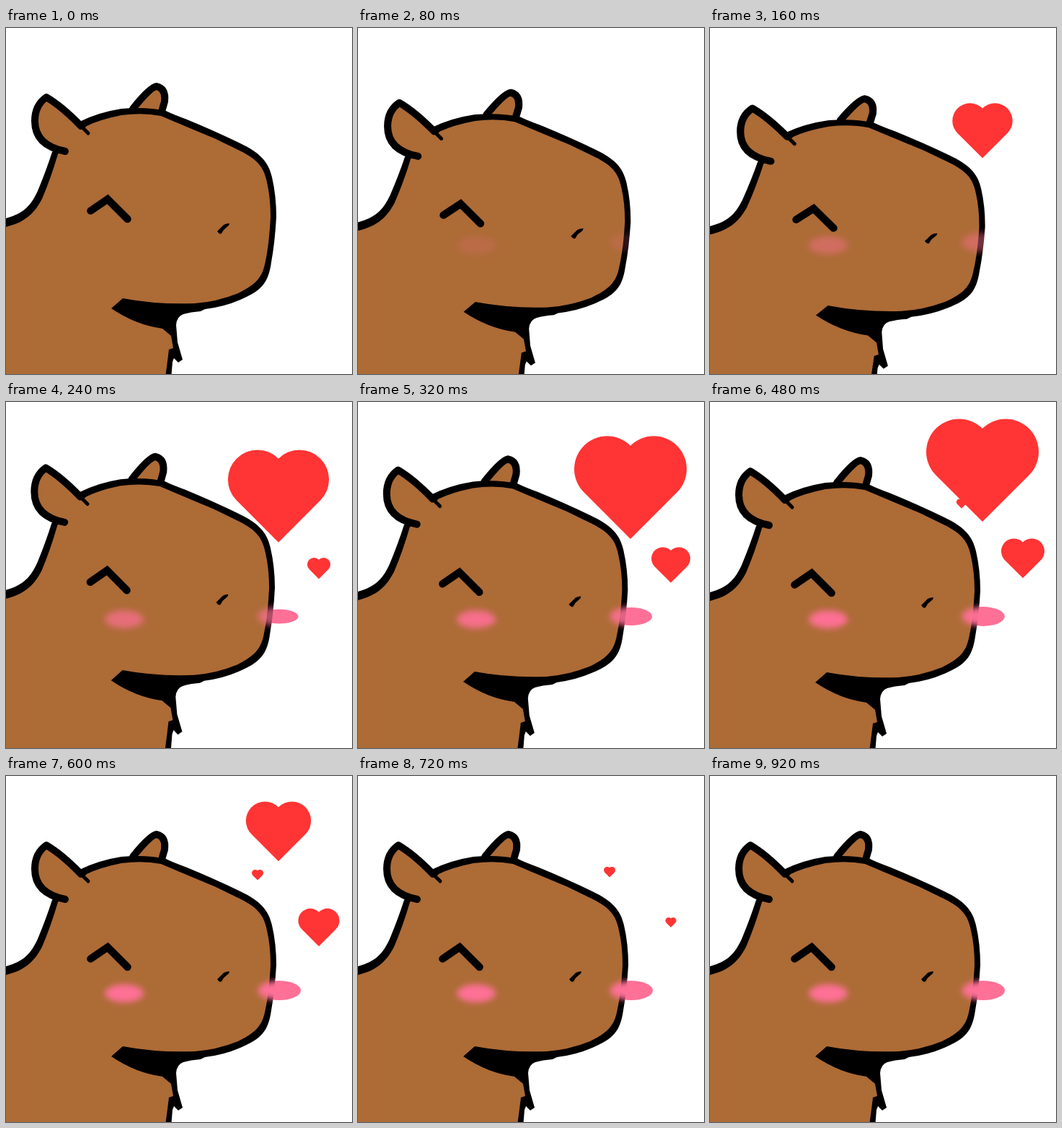
Animation of 480x480 px, one loop 0.96 s. Source, as an HTML page with a canvas:

```html
<!DOCTYPE html>
<html lang="en">
<head>
<meta charset="utf-8">
<title>Happy capybara</title>
<style>
  html, body { margin: 0; width: 100%; height: 100%; overflow: hidden; background: #fff; }
  canvas { display: block; width: 480px; height: 480px; }
</style>
</head>
<body>
<canvas id="stage" width="480" height="480"></canvas>
<script>
const ctx = document.getElementById('stage').getContext('2d');
const LOOP = 960, STEP = 40;
const BROWN = '#ad6b36', INK = '#000', PINK = '#ff7096', RED = '#ff3434';

const silhouette = new Path2D(`M-10 267 L0 264 C27 257 36 243 44 226 Q56 197 64 172
  L102 130 Q128 117 160 112 Q195 109 222 115 Q232 120 250 126.5 Q290 143 325 160
  C352 173 364 185 369 207 Q375 233 375 262 Q373 298 368 325 C364 355 353 365 325 377
  Q302 387 276 390 L270 393 Q256 394 246 397 Q237 400 236 412 L238 436 L245 460
  L239 464 L233 458 L231 463 L228 500 L-10 500 Z`);
const fur = new Path2D(`M-10 279 L0 276 C28 269 40 256 50 237 Q62 209 72 175
  L112 136 Q130 127 160 121 Q190 117 215 122 Q255 139 290 153.5 L325 170.5
  C350 183 358 194 362 214 Q367 236 367 262 Q365 300 360 323 C356 347 346 356 322 368
  Q292 380 262 382 Q210 384 162 375 L146 389 Q180 412 217 417 L229 427 L232 444
  L226 446 L224 462 L219 500 L-10 500 Z`);
const farEar = new Path2D('M176 112 Q200 82 209 81 Q222 84 220 102 L216 116');
const nearEar = new Path2D('M104 136 Q78 109 56 96 C43 105 40 118 40 129 C40 153 56 166 82 171');
const earFill = new Path2D('M114 146 Q78 109 56 96 C43 105 40 118 40 129 C40 153 56 166 82 171 Z');
const earTip = new Path2D('M100 132 L114 146');
const eye = new Path2D('M117.5 253.5 L141 237.5 L168.5 265');
const nostril = new Path2D('M293 282 L302 273 Q306 271 310 271 L309 274 L302 280 L299 285 Q296 287 293 282 Z');

// [time, value] steps
const squash = [[0, 0], [40, .15], [80, .5], [120, .9], [160, 1], [200, .3],
  [240, -.3], [280, -.22], [320, -.1], [400, 0]];
const blush = [[0, 0], [40, .04], [160, .44], [240, .7], [320, .89], [400, .97], [560, 1]];

// x, start y, rise per ms, full width, delay
const hearts = [
  [378, 166.3, .149, 156, 0],
  [434, 244.5, .0575, 60, 80],
  [349, 157, .033, 16, 240]
];

function valueAt(steps, t) {
  const i = steps.findIndex(s => s[0] > t);
  if (i < 0) return steps[steps.length - 1][1];
  const [t0, a] = steps[i - 1], [t1, b] = steps[i];
  return a + (b - a) * (t - t0) / (t1 - t0);
}

const clamp = x => Math.min(1, Math.max(0, x));
const easeIn = x => clamp(x) ** 2;
const easeOut = x => 1 - easeIn(1 - x);
const heartScale = t => easeOut((t - 90) / 220) - easeIn((t - 480) / 185);

function fill(path, color) {
  ctx.fillStyle = color;
  ctx.fill(path);
}

function stroke(path, width) {
  ctx.lineWidth = width;
  ctx.stroke(path);
}

function drawCapybara(k) {
  ctx.setTransform(1 + .018 * k, .01 * k, -.012 * k, 1 - .023 * k, 3 * k, 17 * k);
  ctx.strokeStyle = INK;
  ctx.lineCap = 'round';
  ctx.lineJoin = 'round';
  fill(farEar, BROWN);
  stroke(farEar, 10);
  fill(silhouette, INK);
  fill(fur, BROWN);
  fill(earFill, BROWN);
  stroke(nearEar, 10);
  stroke(earTip, 5);
  ctx.lineJoin = 'miter';
  stroke(eye, 10.5);
  fill(nostril, INK);
  ctx.resetTransform();
}

function ellipse(x, y, rx, ry) {
  ctx.beginPath();
  ctx.ellipse(x, y, rx, ry, 0, 0, 7);
  ctx.fill();
}

// Soft on the fur, hard-edged where the cheek pokes past the outline
function drawBlush(alpha) {
  ctx.save();
  ctx.fillStyle = PINK;
  ctx.globalCompositeOperation = 'source-atop';
  ctx.globalAlpha = alpha;
  ctx.filter = 'blur(4.5px)';
  ellipse(164, 301.5, 27, 12.5);
  ellipse(379, 297.5, 29.5, 13.5);
  ctx.restore();
  if (alpha <= .5) return;
  ctx.save();
  const inset = 8 * (1 / alpha - 1);
  ctx.fillStyle = PINK;
  ctx.globalCompositeOperation = 'destination-over';
  ellipse(379, 297.5, 30 - inset, 13.5 - inset);
  ctx.restore();
}

function drawHeart(x, y, width) {
  const r = width / (2 + Math.SQRT2), d = r * Math.SQRT1_2, q = Math.PI / 4;
  const cy = y + (r - d) / 2;
  ctx.beginPath();
  ctx.arc(x - d, cy - d, r, 3 * q, -q);
  ctx.arc(x + d, cy - d, r, -3 * q, q);
  ctx.lineTo(x, cy + 2 * d);
  ctx.fillStyle = RED;
  ctx.fill();
}

function draw(t) {
  ctx.clearRect(0, 0, 480, 480);
  drawCapybara(valueAt(squash, t));
  drawBlush(valueAt(blush, t));
  for (const [x, y, rise, width, delay] of hearts) {
    const size = width * heartScale(t - delay);
    if (size > .5) drawHeart(x, y - rise * t, size);
  }
}

const start = performance.now();
function tick() {
  const t = (performance.now() - start) % LOOP;
  draw(Math.floor(t / STEP) * STEP);
  requestAnimationFrame(tick);
}
tick();
</script>
</body>
</html>
```
